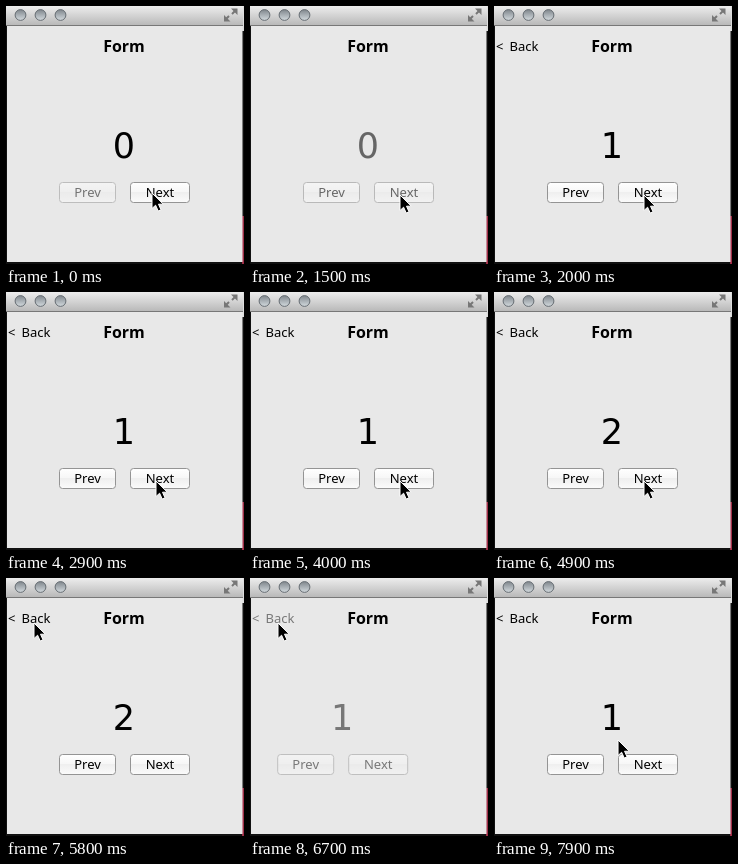
An HTML page that plays this animation: 238 by 258 pixels, repeating every 8000 ms.

```html
<!DOCTYPE html>
<html lang="en">
<head>
<meta charset="utf-8">
<title>Form</title>
<style>
html, body { margin: 0; width: 100%; height: 100%; overflow: hidden; background: #e8e8e8; }
svg { display: block; width: 100%; height: 100%; }
text { font: 13px "Noto Sans", "Open Sans", sans-serif; fill: #000; }
.title { font-size: 16px; font-weight: bold; }
.digit { font: 35px "DejaVu Sans", sans-serif; }
.mid { text-anchor: middle; }
.button rect { fill: url(#face); stroke: #949494; }
</style>
</head>
<body>
<svg viewBox="0 0 238 258">
  <defs>
    <linearGradient id="bar" x2="0" y2="1">
      <stop stop-color="#ededed"/><stop offset="1" stop-color="#b9b9b9"/>
    </linearGradient>
    <linearGradient id="face" x2="0" y2="1">
      <stop stop-color="#fff"/><stop offset=".5" stop-color="#f6f6f6"/>
      <stop offset=".5" stop-color="#efefef"/><stop offset="1" stop-color="#fbfbfb"/>
    </linearGradient>
    <linearGradient id="light" x2="0" y2="1">
      <stop stop-color="#7f868c"/><stop offset="1" stop-color="#d3dade"/>
    </linearGradient>
    <g id="dot"><circle cy="9" r="5.4" fill="url(#light)" stroke="#666d73"/></g>
  </defs>

  <rect width="238" height="258" fill="#111"/>
  <rect x="236" y="210" width="2" height="48" fill="#a02f48"/>
  <rect x="236" width="2" height="25" fill="#ddd"/>
  <rect x="1" width="235.5" height="256" fill="#e8e8e8"/>
  <rect width="237" height="19" fill="url(#bar)"/>
  <rect y="19" width="237" height="1" fill="#777"/>
  <use href="#dot" x="14.5"/><use href="#dot" x="34.5"/><use href="#dot" x="54.5"/>
  <path d="M225 2.5h6.500v6.500zM218 9v6.500h6.500z" fill="#777"/>
  <path d="M226 8l3-3M220 13l3-3" stroke="#777" stroke-width="2"/>

  <text class="title mid" x="118" y="46">Form</text>
  <g id="back"><text x="2" y="45">&lt;</text><text x="15.500" y="45">Back</text></g>
  <g id="page">
    <text id="count" class="digit mid" x="118" y="152">0</text>
    <g id="prev" class="button">
      <rect x="53.500" y="176.500" width="56" height="20" rx="3"/>
      <text class="mid" x="81.500" y="191">Prev</text>
    </g>
    <g class="button">
      <rect x="124.500" y="176.500" width="59" height="20" rx="3"/>
      <text class="mid" x="154" y="191">Next</text>
    </g>
  </g>
  <path id="cursor" d="M0 0V15.500L3.600 12.200L6.200 18L9 16.800L6.500 11.200H11.300Z" fill="#000" stroke="#fff"/>
</svg>
<script>
const LOOP = 8000, HALF = 250, SLIDE = 50;
const $ = id => document.getElementById(id);

// Page changes: start time, old page, new page
const turns = [[1390, 0, 1], [4100, 1, 2], [6330, 2, 1]];

// Pointer stops: time, x, y
const stops = [
  [0, 146, 187], [500, 150, 189], [5600, 150, 189],
  [5700, 108, 136], [5800, 28, 45], [7300, 28, 45], [7900, 124, 162], [LOOP, 128, 166]
];

function pointer(t) {
  const i = stops.findIndex(s => s[0] > t);
  const [t0, x0, y0] = stops[i - 1], [t1, x1, y1] = stops[i];
  const p = (t - t0) / (t1 - t0);
  return [x0 + (x1 - x0) * p, y0 + (y1 - y0) * p];
}

// The old page fades out in place, then the new one slides and fades in.
function pageAt(t) {
  let state = { number: 0, alpha: 1, shift: 0 };
  for (const [start, from, to] of turns) {
    if (t < start) break;
    const p = (t - start) / HALF;
    if (p < 1) state = { number: from, alpha: 1 - p, shift: 0 };
    else {
      const q = Math.min(1, p - 1);
      state = { number: to, alpha: q, shift: (1 - q) * SLIDE * Math.sign(to - from) };
    }
  }
  return state;
}

function draw(t) {
  const { number, alpha, shift } = pageAt(t);
  $("count").textContent = number;
  $("page").setAttribute("opacity", alpha);
  $("page").setAttribute("transform", `translate(${shift})`);
  $("back").setAttribute("opacity", number ? alpha : 0);
  $("prev").setAttribute("opacity", t < turns[0][0] ? 0.5 : 1);
  $("cursor").setAttribute("transform", `translate(${pointer(t)})`);
}

function tick() {
  draw(performance.now() % LOOP);
  requestAnimationFrame(tick);
}
tick();
</script>
</body>
</html>
```
